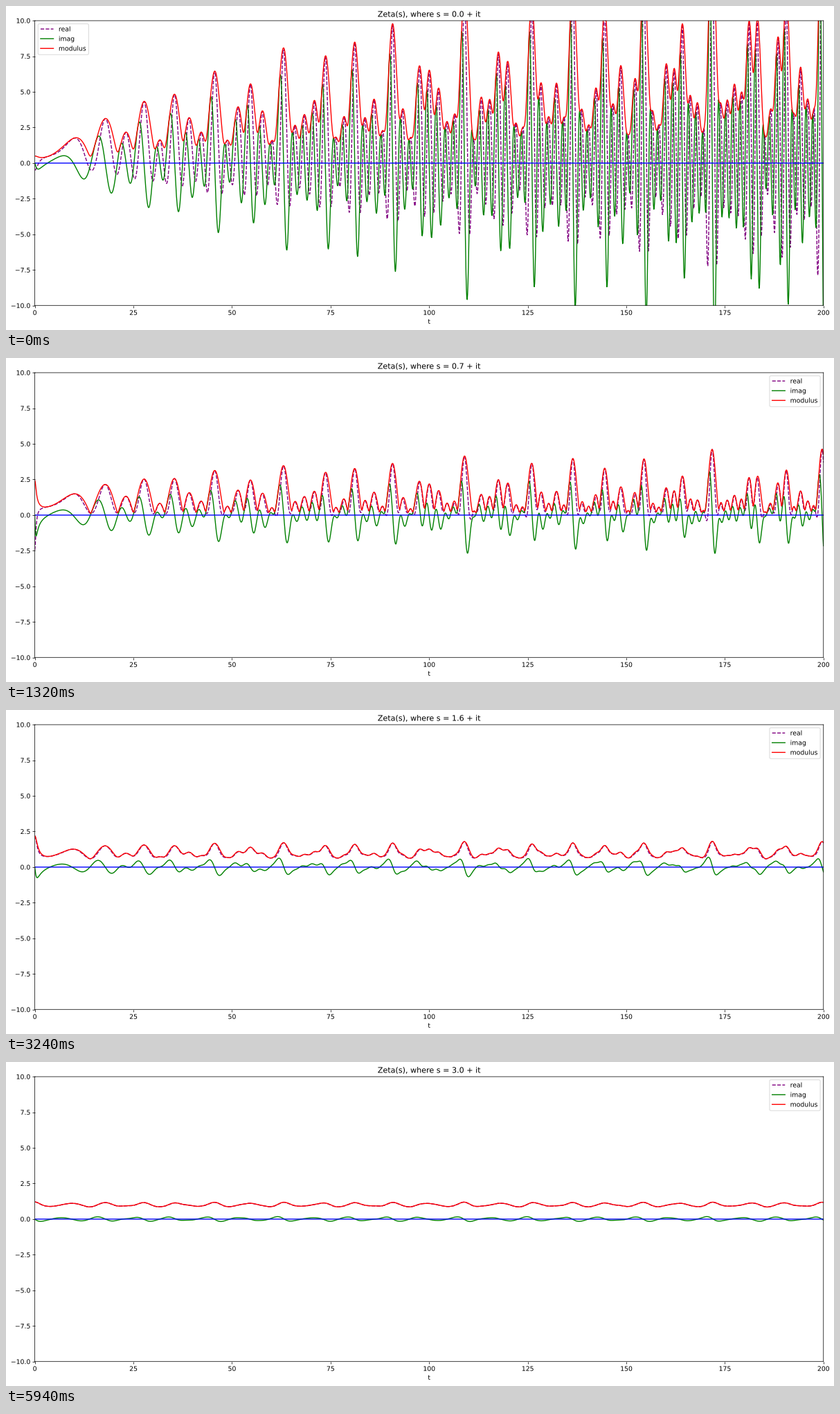
Recreate the animation shown at these times as a matplotlib script. Size 1196 by 468 pixels, loop 6000 ms.

```python
import numpy as np
import matplotlib.pyplot as plt
from matplotlib import patheffects
from matplotlib.animation import FuncAnimation

WIDTH, HEIGHT = 1196, 468
DPI = 66.8125
FRAMES, INTERVAL = 100, 60

# Axes box in pixels, measured from the lower left corner
LEFT, BOTTOM = 41.6, 35.3
AX_W, AX_H = 17.05 * DPI, 6.16 * DPI

# Euler-Maclaurin setup for the zeta function along a vertical line
TERMS = 150
BERNOULLI = (1 / 6, -1 / 30, 1 / 42, -1 / 30, 5 / 66, -691 / 2730)

t = np.linspace(0, 200, 2000)
n = np.arange(1, TERMS)
phases = np.exp(-1j * np.outer(t, np.log(n)))


def zeta(sigma):
    s = sigma + 1e-6 + 1j * t  # tiny shift avoids the pole at s = 1
    tail = TERMS ** (-s)
    total = phases @ n ** (-sigma) + tail * TERMS / (s - 1) + tail / 2
    factor = s * tail / (2 * TERMS)
    for k, b in enumerate(BERNOULLI, 1):
        total += b * factor
        m = 2 * k
        factor = factor * (s + m - 1) * (s + m) / ((m + 1) * (m + 2) * TERMS**2)
    return total


# Smooth subpixel placement of lines and text
plt.rcParams["path.snap"] = False
plt.rcParams["path.effects"] = [patheffects.Normal()]

# The small margin keeps the pixel size from rounding down
fig = plt.figure(figsize=((WIDTH + 1e-6) / DPI, (HEIGHT + 1e-6) / DPI), dpi=DPI)
ax = fig.add_axes((LEFT / WIDTH, BOTTOM / HEIGHT, AX_W / WIDTH, AX_H / HEIGHT))

real, = ax.plot([], [], color="purple", linestyle="--", label="real")
imag, = ax.plot([], [], color="green", label="imag")
modulus, = ax.plot([], [], color="red", label="modulus")
ax.axhline(0, color="blue")
ax.set(xlim=(0, 200), ylim=(-10, 10), xlabel="t")
title = ax.set_title("")
ax.legend(loc="best", labelspacing=0.54)  # moves to the emptiest corner


def update(i):
    sigma = 3 * i / (FRAMES - 1)
    z = zeta(sigma)
    real.set_data(t, z.real)
    imag.set_data(t, z.imag)
    modulus.set_data(t, np.abs(z))
    title.set_text(f"Zeta(s), where s = {sigma:.1f} + it")
    return real, imag, modulus, title


anim = FuncAnimation(fig, update, frames=FRAMES, interval=INTERVAL,
                     repeat=True, repeat_delay=0)
plt.show()
```
